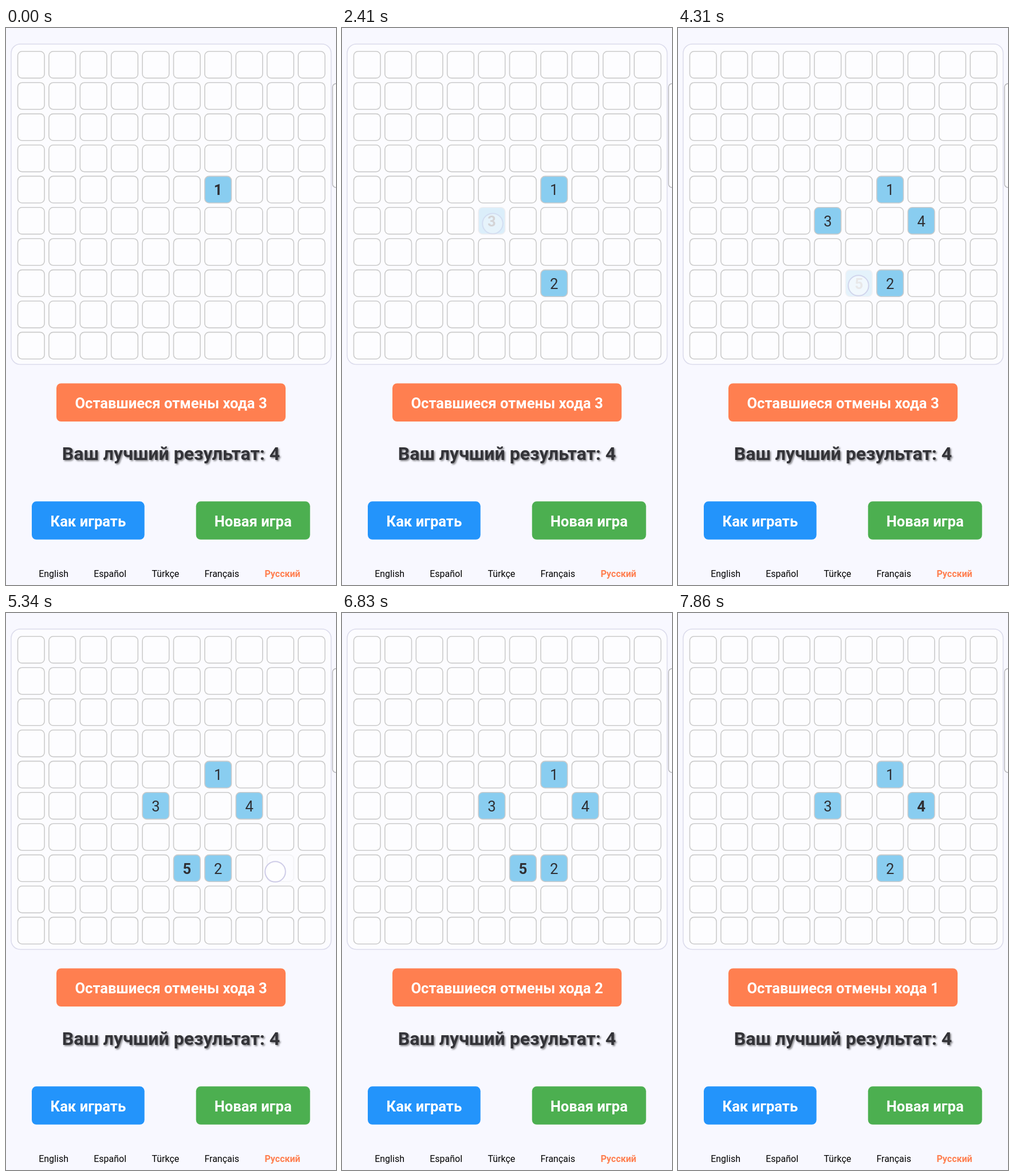
Write an HTML page that moves like this. It is 576 px wide and 971 px high and loops after 8000 ms.

```html
<!DOCTYPE html>
<html lang="ru">
<head>
<meta charset="utf-8">
<title>Игра с числами</title>
<style>
  html, body { margin: 0; width: 100%; height: 100%; overflow: hidden; background: #f8f8ff; }
  svg { display: block; width: 576px; height: 971px; font-family: Roboto, "Noto Sans", sans-serif; }
  text { text-anchor: middle; }
  .cell rect { fill: #fdfdff; stroke: #cbcbcb; stroke-width: 1.6; }
  .cell.on rect { fill: #89cdf0; }
  .cell text { font-size: 25.6px; fill: #2f2f33; }
  .cell.last text { font-weight: 700; }
  .button text { font-size: 25.6px; font-weight: 700; fill: #fff; }
  .best { font-size: 32px; font-weight: 700; fill: #333338; text-shadow: 2px 2px 3px rgba(0, 0, 0, .45); }
  .lang text { font-size: 16px; text-anchor: start; fill: #000; }
  .lang .active { font-weight: 700; fill: #ff7f50; }
</style>
</head>
<body>
<svg viewBox="0 0 576 971">
  <rect width="576" height="971" fill="#f8f8ff"/>
  <rect x="9" y="28" width="558.5" height="558.5" rx="16" fill="#fcfcff" stroke="#dcdcec" stroke-width="1.6"/>
  <g id="board"></g>
  <rect x="570" y="97" width="30" height="181" rx="6" fill="#fcfcff" stroke="#b4b4b8" stroke-width="1.4"/>
  <g class="button" id="undo">
    <rect x="88" y="619.5" width="400" height="66.5" rx="8" fill="#ff7f50"/>
    <text x="288" y="662.5"></text>
  </g>
  <text class="best" x="288" y="752.5">Ваш лучший результат: 4</text>
  <g class="button">
    <rect x="45" y="825.3" width="196.7" height="66.5" rx="8" fill="#2394fb"/>
    <text x="143.4" y="868.5">Как играть</text>
  </g>
  <g class="button">
    <rect x="331.7" y="825.3" width="199" height="66.5" rx="8" fill="#4caf50"/>
    <text x="431.2" y="868.5">Новая игра</text>
  </g>
  <g class="lang">
    <text x="57.2" y="957.3">English</text>
    <text x="153.2" y="957.3">Español</text>
    <text x="254.4" y="957.3">Türkçe</text>
    <text x="346.4" y="957.3">Français</text>
    <text x="451.4" y="957.3" class="active">Русский</text>
  </g>
  <circle id="touch" r="17.8" fill="#fff" fill-opacity=".85" stroke="#c3c0e2" stroke-width="2"/>
</svg>
<script>
  const LOOP = 8000, SIZE = 10, PITCH = 54.4;
  const NS = 'http://www.w3.org/2000/svg';
  const board = document.getElementById('board');
  const undo = document.getElementById('undo');
  const undoText = undo.querySelector('text');
  const touch = document.getElementById('touch');

  // column and row of each number, in order
  const moves = [[6, 4], [6, 7], [4, 5], [7, 5], [5, 7], [8, 7]];

  // start, end, finger x and y, numbers on the board afterwards
  const taps = [
    { start: 50, end: 530, x: 371, y: 449, count: 2 },
    { start: 1950, end: 2570, x: 263, y: 341, count: 3 },
    { start: 2980, end: 3440, x: 429, y: 339, count: 4 },
    { start: 4060, end: 4520, x: 315, y: 449, count: 5 },
    { start: 5140, end: 5600, x: 470, y: 451, count: 6 },
    { start: 6160, end: 6620, x: 294, y: 659, count: 5, undo: true },
    { start: 7340, end: 7800, x: 294, y: 659, count: 4, undo: true }
  ];

  const clamp = v => Math.min(1, Math.max(0, v));
  const ease = v => v < .5 ? 2 * v * v : 1 - 2 * (1 - v) ** 2;
  const releaseOf = tap => tap.end - 215;

  function add(parent, tag, attrs) {
    const el = document.createElementNS(NS, tag);
    for (const key in attrs) el.setAttribute(key, attrs[key]);
    return parent.appendChild(el);
  }

  const grid = [];
  for (let i = 0; i < SIZE * SIZE; i++) {
    const x = 20.5 + i % SIZE * PITCH, y = 40.8 + Math.floor(i / SIZE) * PITCH;
    const cell = add(board, 'g', { class: 'cell' });
    add(cell, 'rect', { x, y, width: 46.6, height: 46.6, rx: 7.5 });
    add(cell, 'text', { x: x + 23.3, y: y + 33 });
    grid.push(cell);
  }
  const cells = moves.map(([col, row]) => grid[row * SIZE + col]);

  function pressOpacity(t, tap) {
    if (t < tap.start) return 1;
    const release = releaseOf(tap);
    return t < release
      ? 1 - .8 * ease(clamp((t - tap.start + 70) / 150))
      : .2 + .8 * ease(clamp((t - release) / 250));
  }

  function draw(t) {
    let count = 1, left = 3, active = null;
    for (const tap of taps) {
      if (t >= tap.start) active = tap;
      if (t >= releaseOf(tap)) {
        count = tap.count;
        if (tap.undo) left--;
      }
    }

    cells.forEach((cell, i) => {
      const on = i < count;
      cell.setAttribute('class', 'cell' + (on ? ' on' : '') + (i === count - 1 ? ' last' : ''));
      cell.lastChild.textContent = on ? i + 1 : '';
      cell.setAttribute('opacity', 1);
    });
    undoText.textContent = 'Оставшиеся отмены хода ' + left;
    undo.setAttribute('opacity', 1);
    touch.setAttribute('opacity', 0);

    if (active) {
      const pressed = active.undo ? undo : cells[active.count - 1];
      pressed.setAttribute('opacity', pressOpacity(t, active));
      touch.setAttribute('cx', active.x);
      touch.setAttribute('cy', active.y);
      touch.setAttribute('opacity', 1 - clamp((t - releaseOf(active) + 90) / 225));
    }
  }

  const begin = performance.now();
  function tick() {
    draw((performance.now() - begin) % LOOP);
    requestAnimationFrame(tick);
  }
  draw(0);
  requestAnimationFrame(tick);
</script>
</body>
</html>
```
